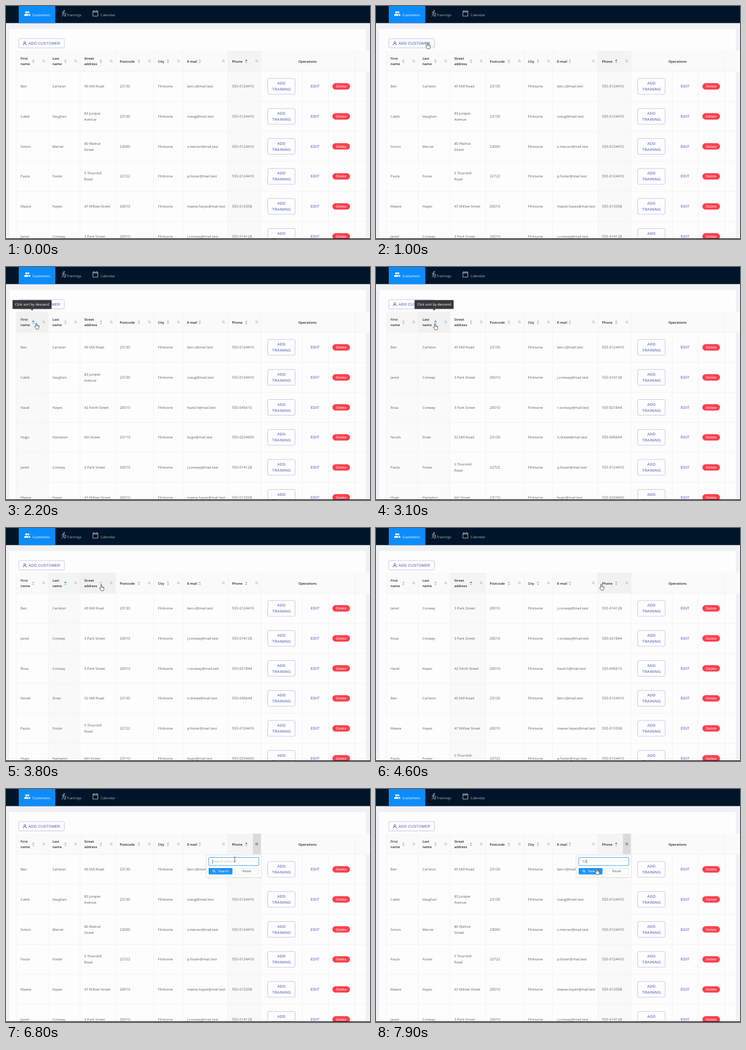
Write an HTML page that moves like this. It is 600 px wide and 386 px high and loops after 8 s.

```html
<!DOCTYPE html>
<html lang="en">
<head>
<meta charset="utf-8">
<title>Customer table</title>
<style>
  html, body { margin: 0; width: 100%; height: 100%; overflow: hidden; background: #f0f1f5; }
  svg { display: block; width: 600px; height: 386px; }
  text { font: 5.75px "Open Sans", "Noto Sans", sans-serif; fill: #626266; text-rendering: geometricPrecision; white-space: pre; }
  .num { font-size: 6px; }
  .head { font-size: 5.6px; font-weight: 600; fill: #2b2b2e; }
  .mid { text-anchor: middle; }
  .light { fill: #fff; }
  .dim { fill: #a9b1b9; }
  .action { font: 6.2px "Liberation Sans", Arial, sans-serif; letter-spacing: .18px; fill: #4052b0; }
  .outline { fill: #fefeff; stroke: #bfc2dc; stroke-width: .8; }
  .line { stroke: #f2f1f4; stroke-width: .8; }
  .icon { fill: none; stroke-width: .8; }
</style>
</head>
<body>
<svg id="stage" viewBox="0 0 600 386"></svg>
<script>
const LOOP = 8000, ROW = 49.7, TOP = 108.3;
const stage = document.getElementById('stage');

const columns = [
  { x: 17, head: 'First|name', sorter: 45 },
  { x: 69.5, head: 'Last|name', sorter: 98 },
  { x: 122, head: 'Street|address', sorter: 156.5 },
  { x: 180.5, head: 'Postcode', sorter: 219, num: true },
  { x: 243.5, head: 'City', sorter: 267 },
  { x: 291.5, head: 'E-mail', sorter: 319.5 },
  { x: 365.5, head: 'Phone', sorter: 396, num: true }
];
const TABLE_END = 420.5;
columns.forEach((c, i) => c.end = i < 6 ? columns[i + 1].x : TABLE_END);

const people = [
  ['Ben', 'Carlston', '45 Mill Road', '23130', 'ben.c', '555-0124410'],
  ['Caleb', 'Vaughan', '83 Juniper|Avenue', '23130', 'cvaug', '555-0124410'],
  ['Simon', 'Mercer', '80 Walnut|Street', '23000', 's.mercer', '555-0124410'],
  ['Paula', 'Foster', '5 Thornhill|Road', '22722', 'p.foster', '555-0124410'],
  ['Maeve', 'Hayes', '47 Willow Street', '20010', 'maeve.hayes', '555-013358'],
  ['Jared', 'Conway', '3 Park Street', '20010', 'j.conway', '555-014128'],
  ['Rosa', 'Conway', '3 Park Street', '20010', 'r.conway', '555-021844'],
  ['Hugo', 'Hampton', '6th Street', '23110', 'hugo', '555-0234650'],
  ['Hazel', 'Hayes', '42 Ninth Street', '20010', 'hazel.h', '555-045610'],
  ['Norah', 'Drew', '52 Mill Road', '23130', 'n.drewe', '555-045644']
].map(([first, last, street, code, mail, phone]) =>
  [first, last, street, code, 'Flintsone', mail + '@mail.test', phone]);

// [time, column]
const sorts = [[-1000, 6], [1950, 0], [3000, 1], [4050, 2], [4850, 6]];
// [column, shown, clicked, hidden, top]
const tips = [
  [0, 1680, 1950, 2700, 54.7], [1, 2820, 3000, 3500, 54.7],
  [2, 3900, 4050, 4350, 54.7], [6, 4680, 4850, 5950, 59.3]
];
// [time, x, y] of the pointer's tip
const path = [
  [500, 300, 400], [900, 85, 61], [1200, 85, 61], [1600, 50, 92], [2000, 50, 93],
  [2450, 50, 93], [2800, 97, 94], [3300, 97.5, 94], [3700, 157, 94], [4200, 158, 94],
  [4650, 379, 93], [5000, 379, 96], [5700, 379, 96], [6100, 413, 91], [6500, 413, 91],
  [6850, 375, 118], [7500, 375, 118], [7850, 364, 132]
];

function el(tag, attrs, parent = stage) {
  const node = document.createElementNS('http://www.w3.org/2000/svg', tag);
  for (const k in attrs) node.setAttribute(k, attrs[k]);
  parent.append(node);
  return node;
}
const group = (parent = stage) => el('g', {}, parent);
const rect = (x, y, width, height, attrs, parent) => el('rect', { x, y, width, height, ...attrs }, parent);
const draw = (d, attrs, parent) => el('path', { d, ...attrs }, parent);
function text(x, y, str, cls, parent) {
  const node = el('text', { x, y, class: cls || '' }, parent);
  node.textContent = str;
  return node;
}
// Lines split at "|" and centred on y
function lines(x, y, str, cls, parent) {
  const parts = str.split('|');
  parts.forEach((s, i) => text(x, y + 2.1 + (i - (parts.length - 1) / 2) * 9.9, s, cls, parent));
}
function magnifier(x, y, stroke, parent) {
  return draw(`M${x - 2.1} ${y - .5}a1.6 1.6 0 1 0 3.2 0a1.6 1.6 0 1 0-3.2 0M${x + .7} ${y + .7}l1.5 1.5`,
    { class: 'icon', stroke, 'stroke-width': .6 }, parent);
}
const clamp = v => Math.max(0, Math.min(1, v));
const setOpacity = (node, v) => node.setAttribute('opacity', v);

function drawNav() {
  rect(0, 0, 600, 28.3, { fill: '#001529' });
  rect(21, 0, 60.3, 28.3, { fill: '#0c8cfb' });
  draw('M30 16.2v-1.3q0-1.9 3.5-1.9t3.5 1.9v1.3zM37.8 16.2v-1.3q0-1.2-.9-1.8q3.2.1 3.2 1.8v1.3z', { fill: '#fff' });
  el('circle', { cx: 33.4, cy: 10.4, r: 1.7, fill: '#fff' });
  el('circle', { cx: 36.9, cy: 10.4, r: 1.6, fill: '#fff' });
  el('circle', { cx: 95.8, cy: 8.1, r: 1, fill: '#c3c9cf' });
  draw('M92.5 12.2l.6-1.8 2-.7 1.3 2 1.9.7M95 9.8l-.8 3.2 1.7 1.5.4 3M94.2 13l-.6 2.2-1.7 2.1M98 12v5.3',
    { class: 'icon', stroke: '#c3c9cf' });
  draw('M143.2 8.6h8.2v8.2h-8.2zM143.2 10h8.2M145 7v1.6M149.6 7v1.6', { class: 'icon', stroke: '#c3c9cf' });
  text(43.6, 17, 'Customers', 'light');
  text(100, 17, 'Trainings', 'dim');
  text(156, 17, 'Calendar', 'dim');
}

function drawCaret(x, y, dir, parent) {
  return draw(`M${x - 2} ${y}h4l-2 ${2.6 * dir}z`, { fill: '#bdbdc1' }, parent);
}

drawNav();
rect(5.5, 38, 587.5, 348, { fill: '#fdfdfe' });
const addButton = rect(21, 54, 75.2, 15.4, { rx: 1.8, class: 'outline' });
el('circle', { cx: 31, cy: 60.5, r: 1.6, class: 'icon', stroke: '#4052b0' });
draw('M28.2 65q0-2.8 2.8-2.8t2.8 2.8', { class: 'icon', stroke: '#4052b0' });
text(37.2, 64, 'ADD CUSTOMER', 'action');

rect(17, 74, 583, 34.3, { fill: '#fafafb' });
for (const c of columns) {
  c.shade = group();
  rect(c.x, 74, c.end - c.x, 34.3, { fill: '#f4f4f5' }, c.shade);
  rect(c.x, TOP, c.end - c.x, 280, { fill: '#f9f9fa' }, c.shade);
  c.hover = rect(c.x, 74, c.end - c.x, 34.3, { fill: '#f1f1f2' });
}
const trigger = rect(407, 74, 13.5, 34.3, { fill: '#dadadc' });

for (let i = 0; i < 6; i++) el('path', { d: `M17 ${TOP + i * ROW}H593`, class: 'line' });
for (const x of [...columns.map(c => c.x), TABLE_END, 575]) draw(`M${x} 74V386`, { class: 'line' });
for (const x of [488.3, 531.3]) draw(`M${x} ${TOP}V386`, { class: 'line' });

for (const c of columns) {
  lines(c.x + 7, 91.4, c.head, 'head');
  c.up = drawCaret(c.sorter, 90.9, -1);
  drawCaret(c.sorter, 92.4, 1);
  c.lens = magnifier(c.end - 6.9, 91.3, '#b4b4b8');
}
lines(497, 91.4, 'Operations', 'head mid');

for (let i = 0; i < 6; i++) {
  const y = TOP + (i + .5) * ROW;
  rect(431.5, y - 13, 45, 26, { rx: 1.8, class: 'outline' });
  lines(454, y, 'ADD|TRAINING', 'action mid');
  lines(509.6, y, 'EDIT', 'action mid');
  rect(538, y - 5.3, 29, 10.6, { rx: 5.3, fill: '#fc404e' });
  lines(552.5, y - .1, 'Delete', 'light mid');
}

const body = group();
let shownSort = -1;
function fillRows(key) {
  if (key === shownSort) return;
  shownSort = key;
  body.replaceChildren();
  const order = [...people].sort((a, b) => a[key] < b[key] ? -1 : a[key] > b[key] ? 1 : 0);
  order.slice(0, 6).forEach((person, i) => person.forEach((value, k) =>
    lines(columns[k].x + 7, TOP + (i + .5) * ROW, value, columns[k].num ? 'num' : '', body)));
}

const popup = group();
rect(329, 109, 93, 39, { rx: 2, fill: '#000', opacity: .05 }, popup);
rect(330, 109.5, 91, 36.5, { rx: 1.5, fill: '#fff', stroke: '#e4e4e8', 'stroke-width': .7 }, popup);
rect(333.4, 112.8, 84, 14.6, { rx: 2, fill: '#d6ebff' }, popup);
rect(334.2, 113.5, 82.5, 13.2, { rx: 1.4, fill: '#fff', stroke: '#40a0f2', 'stroke-width': .8 }, popup);
const query = text(339.7, 122.3, '', 'num', popup);
const caret = rect(0, 117, .6, 6.6, { fill: '#333' }, popup);
rect(334, 131, 39.3, 10.6, { rx: 1, fill: '#1c94f8' }, popup);
magnifier(343, 136.3, '#fff', popup);
text(349.5, 138.3, 'Search', 'light', popup);
rect(377.3, 131.3, 39.3, 10, { rx: 1, fill: '#fff', stroke: '#dcdce0', 'stroke-width': .6 }, popup);
text(397, 138.3, 'Reset', 'mid', popup);

const tip = group();
const tipBox = rect(0, 0, 0, 14.8, { rx: 1, fill: '#38383a' }, tip);
const tipArrow = draw('M-2.6 0h5.2l-2.6 2.7z', { fill: '#38383a' }, tip);
const tipText = text(0, 0, '', 'light mid', tip);

rect(0, 385, 600, 1, { fill: '#111' });

const pointer = group();
const ink = { fill: '#fff', stroke: '#222', 'stroke-width': .65, 'stroke-linejoin': 'round' };
const hand = group(pointer);
draw('M-.9.8C-.9-.3.9-.3.9.8V3.6Q2 2.8 2.3 3.7Q3 3.2 3.4 4.1Q4.3 3.9 4.4 4.9V6.8Q4.3 8.4 3.3 10H-.4Q-1 8.6-2.6 6.6Q-3.2 5.6-2.2 5.2Q-1.6 5.1-.9 5.8Z', ink, hand);
draw('M.9 3.6v1.6M2.3 3.8v1.6M3.4 4.3v1.3', { stroke: '#222', 'stroke-width': .45 }, hand);
const arrow = draw('M0 0V8.2L1.9 6.4 3.1 9.2 4.3 8.7 3.1 6H5.7Z', ink, pointer);
const beam = draw('M-1.3-3.6H1.3M0-3.6V3.6M-1.3 3.6H1.3', { stroke: '#222', 'stroke-width': .6 }, pointer);

function pointerAt(t) {
  let i = path.findIndex(p => p[0] > t);
  if (i === 0) return path[0].slice(1);
  if (i < 0) return path[path.length - 1].slice(1);
  const [t0, x0, y0] = path[i - 1], [t1, x1, y1] = path[i];
  const u = (t - t0) / (t1 - t0), k = u * u * (3 - 2 * u);
  return [x0 + (x1 - x0) * k, y0 + (y1 - y0) * k];
}

function drawTip(t) {
  const now = tips.find(([, from, , to]) => t >= from && t < to + 100);
  setOpacity(tip, now ? Math.min(clamp((t - now[1]) / 80), clamp((now[3] + 100 - t) / 100)) : 0);
  if (!now) return;
  const [k, , clicked, , top] = now;
  const c = columns[k], down = t >= clicked;
  const mid = k === 6 ? 385.2 : (c.x + c.end) / 2 - (k ? 7 : 7.3) + 7;
  const width = down ? 64.4 : 61.4;
  tipBox.setAttribute('x', mid - width / 2);
  tipBox.setAttribute('y', top);
  tipBox.setAttribute('width', width);
  tipArrow.setAttribute('transform', `translate(${mid} ${top + 14.7})`);
  tipText.setAttribute('x', mid);
  tipText.setAttribute('y', top + 9.5);
  tipText.textContent = `Click sort by ${down ? 'de' : 'a'}scend`;
}

function drawPointer(t, x, y, open) {
  const inside = (l, top, r, b) => x >= l && x < r && y >= top && y < b;
  const typing = open && inside(334, 113, 417, 127);
  const hot = inside(17, 74, TABLE_END, 108.3) || inside(21, 54, 96, 69.5) || (open && inside(334, 131, 417, 142));
  pointer.setAttribute('transform', `translate(${x} ${y})`);
  setOpacity(pointer, t >= path[0][0] ? 1 : 0);
  setOpacity(beam, typing ? 1 : 0);
  setOpacity(hand, hot && !typing ? 1 : 0);
  setOpacity(arrow, hot || typing ? 0 : 1);
  addButton.style.fill = inside(21, 54, 96, 69.5) ? '#f8f9fd' : '';
}

function drawSort(t, x, y) {
  let n = sorts.length - 1;
  while (sorts[n][0] > t) n--;
  const [since, key] = sorts[n];
  const before = n ? sorts[n - 1][1] : -1;
  const k = clamp((t - since) / 200);
  fillRows(key);
  columns.forEach((c, i) => {
    setOpacity(c.shade, i === key ? k : i === before ? 1 - k : 0);
    c.up.setAttribute('fill', i === key ? '#1890ff' : '#bdbdc1');
    setOpacity(c.hover, y >= 74 && y < TOP && x >= c.x && x < c.end ? 1 : 0);
  });
}

function drawPopup(t) {
  const open = t >= 6300;
  const typed = t < 7150 ? '' : t < 7350 ? '1' : '12';
  setOpacity(popup, clamp((t - 6300) / 100));
  setOpacity(trigger, open ? 1 : 0);
  columns[6].lens.setAttribute('stroke', open ? '#555' : '#b4b4b8');
  query.textContent = typed || 'Search phone';
  query.style.fill = typed ? '' : '#bfbfc3';
  caret.setAttribute('x', 339.9 + typed.length * 3.43);
  return open;
}

function frame(now) {
  const t = now % LOOP;
  const [x, y] = pointerAt(t);
  drawSort(t, x, y);
  drawTip(t);
  drawPointer(t, x, y, drawPopup(t));
}

let start;
function tick(now) {
  start ??= now;
  frame(now - start);
  requestAnimationFrame(tick);
}
frame(0);
requestAnimationFrame(tick);
</script>
</body>
</html>
```
